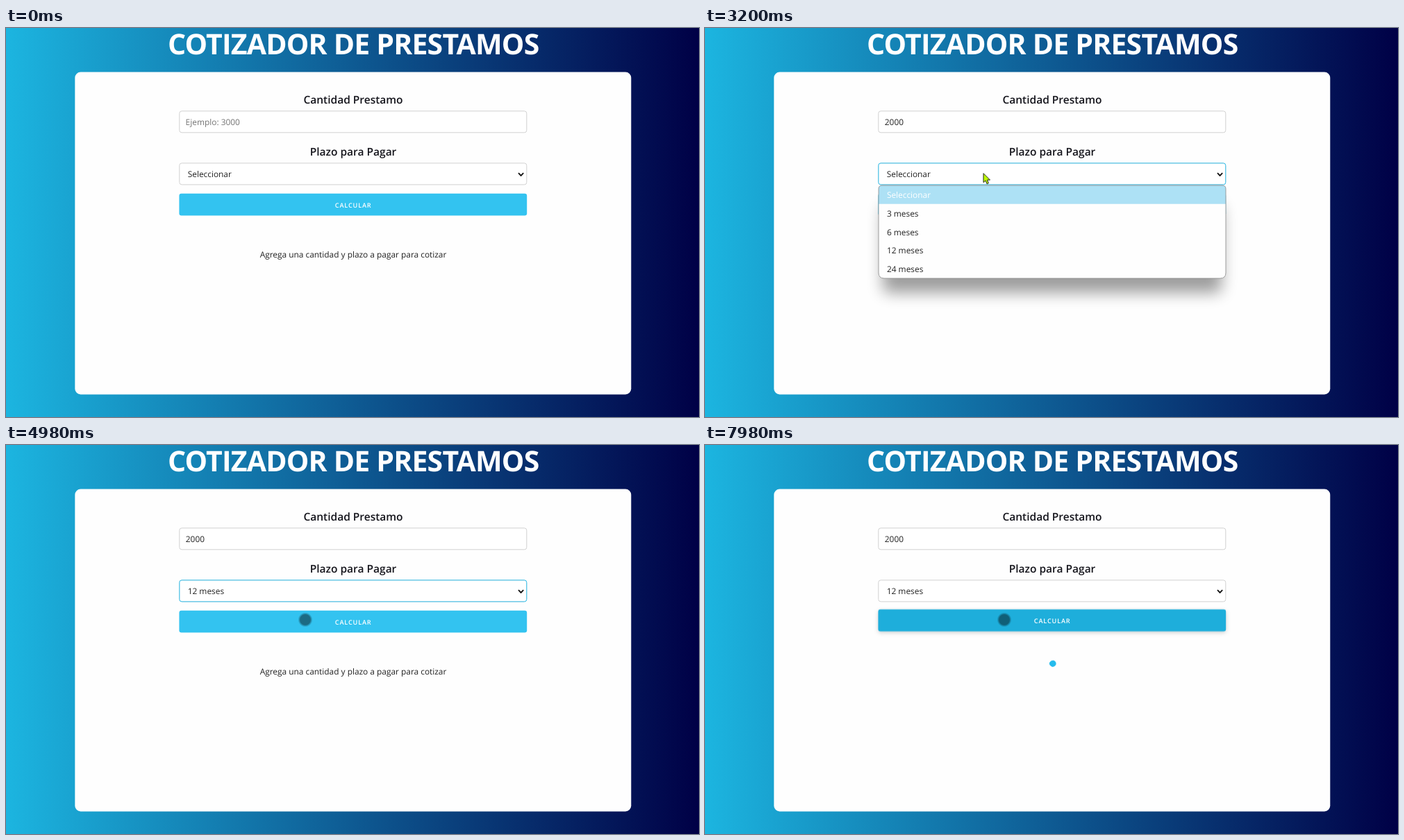
Animation of 998 by 561 pixels, one loop 8000 ms. Source, as an HTML page:

```html
<!DOCTYPE html>
<html lang="es">
<head>
<meta charset="utf-8">
<title>Cotizador</title>
<style>
  html, body { margin: 0; width: 100%; height: 100%; overflow: hidden; }
  body { background: linear-gradient(to right, #1cb5e0, #000046); }
  svg { display: block; width: 100vw; height: 100vh; }

  text {
    font: 11.9px "Open Sans", "Noto Sans", sans-serif;
    fill: #222;
    text-rendering: geometricPrecision;
    white-space: pre;
  }
  .mid { text-anchor: middle; }
  .title { font-size: 41px; font-weight: 700; letter-spacing: -.8px; fill: #fff; }
  .label { font-size: 15.5px; font-weight: 600; fill: #15151c; }
  .caps { font-size: 9.16px; font-weight: 600; letter-spacing: .83px; fill: #fff; }
  .hint { fill: #757575; }
  .light { fill: #fff; }
  .field { fill: #fff; stroke: #d1d1d1; }
  .focus { fill: none; stroke: #33c3f0; }

  /* One loop is 8 s, so 1% = 80 ms */
  .caret { animation: caret 8s step-end infinite; }
  .pointer { animation: pointer 8s linear infinite; }
  .button { animation: lift 8s ease infinite; }
  .button rect { animation: press 8s ease infinite; }
  .spin { animation: spin 8s linear infinite; }
  .dot { animation: chase 8s ease-in-out infinite; }
  .dot circle {
    fill: #25bbec;
    transform-box: fill-box;
    transform-origin: center;
    animation: pulse 8s ease-in-out infinite;
  }
  .dot, .dot circle { animation-delay: calc(var(--i) * .1s - 8s); }

  @keyframes caret {
    0% { transform: none; }
    18.5% { transform: translateX(6.8px); }
    20.875% { transform: translateX(13.6px); }
    23.125% { transform: translateX(20.4px); }
    28.375%, 100% { transform: translateX(26.8px); }
  }
  @keyframes pointer {
    0%, .875% { transform: translate(749px, 444px); }
    4.125% { transform: translate(541px, 285px); }
    6.5% { transform: translate(379px, 134px); }
    7.5%, 34.75% { transform: translate(384px, 131px); }
    36.625%, 40% { transform: translate(401px, 209px); }
    43.5% { transform: translate(384px, 248px); }
    50% { transform: translate(376px, 250px); }
    52.375%, 56.375% { transform: translate(331px, 317px); animation-timing-function: ease-in-out; }
    62.25%, 100% { transform: translate(431px, 252px); }
  }
  @keyframes lift {
    0%, 64% { transform: none; }
    66.5%, 100% { transform: translateY(-1.7px); }
  }
  @keyframes press {
    0%, 64% { fill: #33c3f0; filter: drop-shadow(0 0 0 rgba(0, 0, 0, 0)); }
    66.5%, 100% { fill: #1eaedb; filter: drop-shadow(0 2px 3px rgba(0, 0, 0, .18)); }
  }
  @keyframes spin {
    0%, 64.25% { transform: rotate(0deg); }
    100% { transform: rotate(411.84deg); }
  }
  @keyframes chase {
    0%, 50.5% { transform: rotate(0deg); }
    70.5%, 75.5% { transform: rotate(360deg); }
    95.5%, 100% { transform: rotate(720deg); }
  }
  @keyframes pulse {
    0%, 50.5%, 75.5%, 100% { transform: scale(1); }
    63%, 88% { transform: scale(.4); }
  }
</style>
</head>
<body>
<svg viewBox="0 0 998 561">
  <defs>
    <radialGradient id="disc">
      <stop offset=".7" stop-opacity=".45"/>
      <stop offset=".82" stop-opacity=".24"/>
      <stop offset="1" stop-opacity="0"/>
    </radialGradient>
    <clipPath id="sheet"><path d="M250 232q0-5 5-5H745q5 0 5 5V353q0 8-8 8H258q-8 0-8-8Z"/></clipPath>
    <filter id="blur" x="-20%" y="-50%" width="140%" height="200%"><feGaussianBlur stdDeviation="11"/></filter>
  </defs>

  <text class="title mid" x="500.2" y="38.3">COTIZADOR DE PRESTAMOS</text>
  <rect x="99.3" y="63.5" width="801" height="465" rx="8.3" fill="#fefefe"/>

  <text class="label mid" x="500" y="108.5">Cantidad Prestamo</text>
  <rect class="field" x="249.8" y="119.8" width="500" height="31" rx="3.3"/>
  <rect class="focus" data-on="740-3200" x="249.8" y="119.8" width="500" height="31" rx="3.3"/>
  <text class="hint" data-on="0-1480" x="258.6" y="140">Ejemplo: 3000</text>
  <text x="258.8" y="140"><tspan data-on="1480-8000">2</tspan><tspan data-on="1670-8000">0</tspan><tspan data-on="1850-8000">0</tspan><tspan data-on="2270-8000">0</tspan></text>
  <g class="caret"><rect data-on="740-1250 1480-2780" x="259" y="127" width="1" height="17"/></g>

  <text class="label mid" x="500" y="183.7">Plazo para Pagar</text>
  <rect class="field" x="249.8" y="194.9" width="500" height="31" rx="3.3"/>
  <rect class="focus" data-on="3200-5120" x="249.8" y="194.9" width="500" height="31" rx="3.3"/>
  <text data-on="0-4330" x="261.7" y="215.2">Seleccionar</text>
  <text data-on="4330-8000" x="261.7" y="215.2">12 meses</text>
  <path d="M738 209.2l3.6 3.6 3.6-3.6" fill="none" stroke="#111" stroke-width="1.9"/>

  <g class="button">
    <rect x="249.4" y="238.8" width="500.8" height="31.7" rx="3.3"/>
    <text class="caps mid" x="500.2" y="258.6">CALCULAR</text>
  </g>

  <text class="mid" data-on="0-5120" x="500" y="331.3">Agrega una cantidad y plazo a pagar para cotizar</text>
  <g data-on="5120-8000"><g transform="translate(499.7 332.9)"><g class="spin" id="dots"></g></g></g>

  <g data-on="3200-4330">
    <rect x="256" y="256" width="488" height="126" rx="8" opacity=".38" filter="url(#blur)"/>
    <g clip-path="url(#sheet)">
      <rect x="250" y="227" width="500" height="134" fill="#fefefe"/>
      <g id="options"></g>
    </g>
    <path d="M250 232q0-5 5-5H745q5 0 5 5V353q0 8-8 8H258q-8 0-8-8Z" fill="none" stroke="#8a8a8a" stroke-width=".8"/>
  </g>

  <g class="pointer">
    <circle data-on="70-3200 4330-8000" r="10.5" fill="url(#disc)"/>
    <path data-on="3200-4330" d="M0 .5V13.6L3 10.9 5 15.6 7.4 14.6 5.4 10H9.5Z" fill="#bfff00" stroke="#1c1c1c"/>
  </g>
</svg>
<script>
  const LOOP = 8000;
  const byId = id => document.getElementById(id);

  byId('dots').innerHTML = [0, 1, 2, 3, 4, 5].map(i =>
    `<g class="dot" style="--i:${i}"><circle cx="-12.5" cy="-12.5" r="4.17"/></g>`).join('');

  // Option label and the time it is highlighted
  const options = [
    ['Seleccionar', '3200-4050'],
    ['3 meses', '4050-4120'],
    ['6 meses', '4120-4190'],
    ['12 meses', '4190-4330'],
    ['24 meses', '']
  ];
  byId('options').innerHTML = options.map(([name, on], i) => {
    const top = 227 + i * 26.75;
    const label = cls => `<text class="${cls}" x="261.9" y="${top + 18.2}">${name}</text>`;
    const lit = on && `<g data-on="${on}"><rect x="250" y="${top}" width="500" height="26.75" fill="#ade1f5"/>${label('light')}</g>`;
    return label('') + lit;
  }).join('');

  // data-on lists the "from-to" spans in ms during which an element shows
  for (const el of document.querySelectorAll('[data-on]')) {
    const prop = el.tagName === 'tspan' ? 'fillOpacity' : 'opacity';
    const key = (ms, value) => ({ offset: ms / LOOP, [prop]: value, easing: 'step-end' });
    const spans = el.dataset.on.split(' ').map(s => s.split('-').map(Number));
    const frames = spans.flatMap(([from, to]) => [key(from, 1), key(to, to < LOOP ? 0 : 1)]);
    if (spans[0][0] > 0) frames.unshift(key(0, 0));
    if (spans.at(-1)[1] < LOOP) frames.push(key(LOOP, 0));
    el.animate(frames, { duration: LOOP, iterations: Infinity });
  }
</script>
</body>
</html>
```
